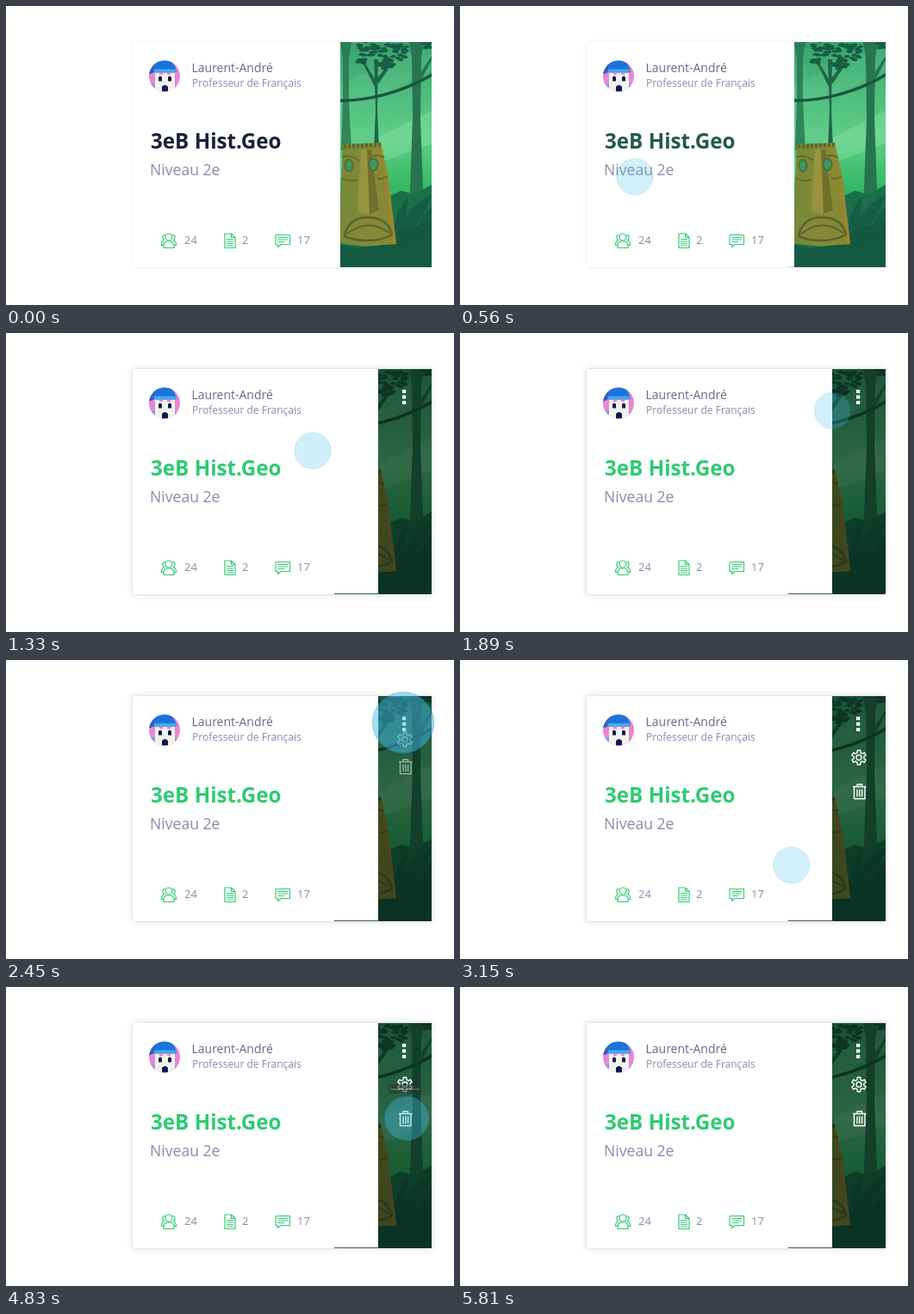
Write an HTML page that moves like this. It is 520x348 px and loops after 6.09 s.

```html
<!DOCTYPE html>
<html lang="fr">
<head>
<meta charset="utf-8">
<title>Carte de classe</title>
<style>
  html, body { margin: 0; width: 100%; height: 100%; overflow: hidden; background: #fff; }
  svg { display: block; width: 520px; height: 348px; font-family: "Open Sans", sans-serif; }
  .frame { fill: #fff; filter: drop-shadow(0 0 .8px rgba(0, 0, 0, .1)); }
  .halo { fill: #fff; filter: drop-shadow(0 0 4px rgba(0, 0, 0, .14)); }
  .muted { fill: #868da9; }
  .line { fill: none; stroke: #2fcb73; stroke-width: 1.2; stroke-linejoin: round; stroke-linecap: round; }
  .tool { fill: none; stroke: #fff; stroke-width: 1.4; stroke-linejoin: round; }
  .tip { transform-box: fill-box; transform-origin: 50% 80%; }
  .tip rect { fill: #29353c; }
  .tip text { fill: #fff; font-size: 10px; text-anchor: middle; }
  #cursor { fill: #45c0f0; stroke: #0a93cc; stroke-width: 1; }
</style>
</head>
<body>
<svg viewBox="0 0 520 348">
  <defs>
    <clipPath id="window"><rect x="381" y="42" width="113" height="262"/></clipPath>
    <clipPath id="round"><circle cx="184" cy="81.500" r="18"/></clipPath>
    <linearGradient id="air" x2="0" y2="1">
      <stop offset="0" stop-color="#36a26c"/>
      <stop offset=".2" stop-color="#4cb97d"/>
      <stop offset=".42" stop-color="#62cd88"/>
      <stop offset=".62" stop-color="#38bd68"/>
      <stop offset=".75" stop-color="#28a55a"/>
      <stop offset="1" stop-color="#14603f"/>
    </linearGradient>
    <linearGradient id="wood" x2="1" y2="0">
      <stop offset="0" stop-color="#75873a"/>
      <stop offset=".6" stop-color="#878b38"/>
      <stop offset="1" stop-color="#8a842f"/>
    </linearGradient>
  </defs>

  <rect class="frame" x="147" y="42" width="347" height="262"/>
  <rect class="halo" id="halo" x="147" y="42" width="347" height="262"/>

  <g clip-path="url(#window)">
    <rect x="381" y="42" width="113" height="262" fill="url(#air)"/>
    <path d="M494 122 388 176V200L494 160Z" fill="#94e8aa" opacity=".32"/>
    <path d="M494 42V74L388 126V92Z" fill="#7adb9c" opacity=".14"/>
    <g fill="#26754f">
      <path d="M388 42H401L398 60 398 110 401 168H389L391 110 391 60Z" opacity=".8"/>
      <path d="M468 42H485L482 60 481 130 485 240H468L472 130 471 60Z"/>
      <path d="M481 78 494 58V63L482 86Z"/>
    </g>
    <path d="M427 168 429 120 427 62H432L431 120 433 168ZM429 96 413 64 415 63 431 90ZM431 84 448 62 451 63 432 91Z" fill="#1e664a"/>
    <g id="leaves" fill="#185c44"></g>
    <path d="M386 110C418 111 460 101 496 79" fill="none" stroke="#1a563f" stroke-width="3.600"/>
    <path d="M444 222 458 215 474 219 494 208V304H444Z" fill="#1a7049"/>
    <path d="M450 262Q454 236 466 222 466 238 462 250 472 230 494 220 486 244 470 262ZM478 262Q480 244 494 234V270Z" fill="#165c47"/>
    <path d="M381 276 420 284 455 262 494 250V304H381Z" fill="#14583f"/>
    <path d="M391 161 435 159 444 202 453 277 420 280 386 276Z" fill="url(#wood)"/>
    <path d="M433 160 435 159 444 202 453 277 449 277.500 441 205Z" fill="#a0842e"/>
    <path d="M392 163.500 436 161.500" stroke="#5a6a2e" stroke-width="5" stroke-dasharray="3 2"/>
    <path d="M390 176Q400 172 410 180M418 179Q428 171 439 176M390 200Q400 206 408 202M431 200Q437 203 443 198" fill="none" stroke="#656c2c" stroke-width="2"/>
    <path d="M412 167H424L433 238Q420 246 408 238Z" fill="#98943e"/>
    <path d="M419 167H424L433 238 422 242Z" fill="#6f702b"/>
    <g fill="#379a64" stroke="#5f6b2d" stroke-width="2">
      <ellipse cx="398" cy="185.500" rx="4.500" ry="7"/>
      <ellipse cx="426.500" cy="184.500" rx="5" ry="7"/>
    </g>
    <path d="M393 268Q397 246 420 246 443 246 448 266 436 273 420 273 404 273 393 268Z" fill="#858838" stroke="#59642b" stroke-width="2.500"/>
    <path d="M396 265Q420 246 445 264" fill="none" stroke="#59642b" stroke-width="2"/>
    <path d="M381 278 405 281 440 278 464 283 494 266V304H381Z" fill="#145a42"/>
    <rect id="shade" x="381" y="42" width="113" height="262" fill="#04160f"/>
  </g>

  <rect id="sheet" x="147" y="42" width="241" height="262" fill="#fff"/>
  <path id="edge" d="M381 303.500H433" stroke="#3f6553"/>

  <g clip-path="url(#round)">
    <rect x="166" y="63" width="36" height="37" fill="#e985d6"/>
    <path d="M166 63H178L172 77 168 79H166Z" fill="#2f62c4"/>
    <path d="M171 77Q172 63 184 63 196 63 198 77Z" fill="#1b74dc"/>
    <path d="M172 73.500H197V77.500H172Z" fill="#45a9ea"/>
    <path d="M166 90H174V100H166ZM195 92H202V100H195Z" fill="#8a9be0"/>
    <path d="M173 78H178V80H182V78H187V80H191V78H196V100H173Z" fill="#f3f1ec"/>
    <path d="M177 87.500V83Q179 80 181 83V87.500ZM188 87.500V83Q190 80 192 83V87.500ZM181 100V94Q184.500 90 188 94V100Z" fill="#101a52"/>
  </g>
  <text x="215.500" y="77" font-size="14" fill="#626a87">Laurent-André</text>
  <text class="muted" x="216" y="94" font-size="12">Professeur de Français</text>
  <text id="title" x="168" y="166" font-size="24.200" font-weight="700">3eB Hist.Geo</text>
  <text class="muted" x="167" y="197" font-size="17.600">Niveau 2e</text>

  <g class="line">
    <g transform="translate(-.5 -.5)">
      <circle cx="189.500" cy="269.500" r="4"/>
      <path d="M183.500 282V278Q184 275 187.500 274.500H191.500Q195 275 195.500 278V282ZM185 267Q182 267 182.500 270 182.500 272 184 273 181 274.500 181 279H183M194 267Q197 267 196.500 270 196.500 272 195 273 198 274.500 198 279H196"/>
    </g>
    <path d="M254 265H261.500L266 269.500V281.500H254ZM261.500 265V269.500H266M256.500 271.500H263.500M256.500 274H263.500M256.500 276.500H263.500M256.500 279H263.500"/>
    <path d="M313 266.500H329.500V277.500H319L315.500 280.500V277.500H313ZM316 269.500H327M316 272H327M316 274.500H323" stroke-width="1.100"/>
  </g>
  <g class="muted" font-size="13">
    <text x="207" y="277">24</text>
    <text x="274" y="277">2</text>
    <text x="338" y="277">17</text>
  </g>

  <path id="dots" d="M460 66h4.200v4h-4.200zM460 72.500h4.200v4h-4.200zM460 79h4.200v4h-4.200z" fill="#fff"/>
  <g id="gear" class="tool">
    <path id="cog"/>
    <circle cx="463" cy="113.500" r="3"/>
  </g>
  <g id="bin" class="tool">
    <path d="M456 147.500H471.500M461 147V144.800H466.500V147M457.500 148V161.500H470V148M461 150.500V159M463.800 150.500V159M466.600 150.500V159"/>
  </g>
  <g id="tipEdit" class="tip">
    <rect x="422" y="62" width="83" height="26" rx="2"/>
    <text x="463.500" y="78.500">Modifier classe</text>
  </g>
  <g id="tipDelete" class="tip">
    <rect x="417" y="101" width="92" height="26" rx="2"/>
    <text x="463" y="117.500">Supprimer classe</text>
  </g>
  <circle id="cursor" r="21"/>
</svg>

<script>
const LOOP = 6090, STEP = 70;
const byId = id => document.getElementById(id);
const animations = [];

// Each key is [time, value]; the first and last values are held to the loop's ends.
function track(id, property, keys, easing = 'linear') {
  const held = [[0, keys[0][1]], ...keys, [LOOP, keys.at(-1)[1]]];
  const frames = held.map(([time, value]) => ({ offset: time / LOOP, [property]: value, easing }));
  const animation = byId(id).animate(frames, { duration: LOOP, fill: 'both' });
  animation.pause();
  animations.push(animation);
}

const move = (x, y) => `translate(${x}px, ${y}px)`;

function drawLeaves() {
  let seed = 11;
  const random = () => (seed = seed * 16807 % 2147483647) / 2147483647;
  const clumps = [[420, 50, 13, 9], [449, 53, 18, 12], [442, 68, 9, 6], [414, 65, 5, 3], [490, 46, 6, 5]];
  let path = '';
  for (const [x, y, w, h] of clumps) {
    for (let i = 0; i < w * 2.2; i++) {
      const angle = random() * Math.PI * 2, reach = Math.sqrt(random());
      const px = x + Math.cos(angle) * w * reach, py = y + Math.sin(angle) * h * reach;
      path += `M${px - 4} ${py}q3 -4 7 -1 q-1 4 -7 1z`;
    }
  }
  byId('leaves').innerHTML = `<path d="${path}"/>`;
}

function drawCog() {
  const points = [];
  for (let tooth = 0; tooth < 6; tooth++) {
    for (const [turn, radius] of [[-.3, 6], [-.2, 8.5], [.2, 8.5], [.3, 6]]) {
      const angle = (tooth + turn) * Math.PI / 3 - Math.PI / 2;
      points.push(`${463 + radius * Math.cos(angle)} ${113.5 + radius * Math.sin(angle)}`);
    }
  }
  byId('cog').setAttribute('d', `M${points.join('L')}Z`);
}

drawLeaves();
drawCog();

// Hover
const hover = [567, 917];
const fade = (id, from, to, span = hover) => track(id, 'opacity', [[span[0], from], [span[1], to]], 'ease-in-out');
track('sheet', 'width', [[hover[0], '241px'], [hover[1], '285px']], 'ease-in-out');
track('title', 'fill', [[490, '#1a2138'], [700, '#2fcb73']]);
fade('shade', 0, .56);
fade('dots', 0, 1, [630, 917]);
fade('halo', 0, 1, [490, 700]);
fade('edge', 0, 1, [490, 700]);

// Menu
track('gear', 'transform', [[2310, move(0, -39)], [2450, move(0, -21)], [2590, move(0, -6)], [2730, move(0, 0)]]);
track('bin', 'transform', [[2310, move(0, -54)], [2450, move(0, -29)], [2590, move(0, -8)], [2730, move(0, 0)]]);
for (const id of ['gear', 'bin']) track(id, 'opacity', [[2310, 0], [2450, .5], [2660, 1]]);

// Pointer: travels, then taps with a growing ring
track('cursor', 'transform', [
  [210, move(126, 228)], [770, move(249, 181)], [1330, move(356, 137)], [2100, move(461, 73)],
  [2800, move(461, 73)], [3010, move(363, 276)], [3605, move(455, 118)],
  [4130, move(455, 118)], [4270, move(476, 289)], [4655, move(465, 153)]
]);
const visits = [[210, 2345], [3010, 3745], [4270, 4795]];
const radii = [], alphas = [];
for (const [enter, tap] of visits) {
  radii.push([enter, '21px'], [tap, '21px'], [tap + 210, '50px'], [tap + 245, '21px']);
  alphas.push([enter - 1, 0], [enter, .25], [tap, .25], [tap + 35, .36], [tap + 105, .48], [tap + 175, .3], [tap + 245, 0]);
}
track('cursor', 'r', radii);
track('cursor', 'opacity', alphas);

// Tooltips
function tooltip(id, show, first, hide) {
  track(id, 'transform', [[show, 'scale(0)'], [show + 70, `scale(${first})`], [show + 140, 'scale(.85)'], [show + 280, 'scale(1)']]);
  track(id, 'opacity', [[show, 0], [show + 70, first + .15], [show + 210, .95], [hide - 70, .95], [hide + 350, 0]]);
}
tooltip('tipEdit', 3710, .29, 4270);
tooltip('tipDelete', 4760, .42, 5460);

const start = performance.now();
function render() {
  const time = (performance.now() - start) % LOOP;
  const shown = Math.floor(time / STEP) * STEP;
  for (const animation of animations) animation.currentTime = shown;
  requestAnimationFrame(render);
}
render();
</script>
</body>
</html>
```
